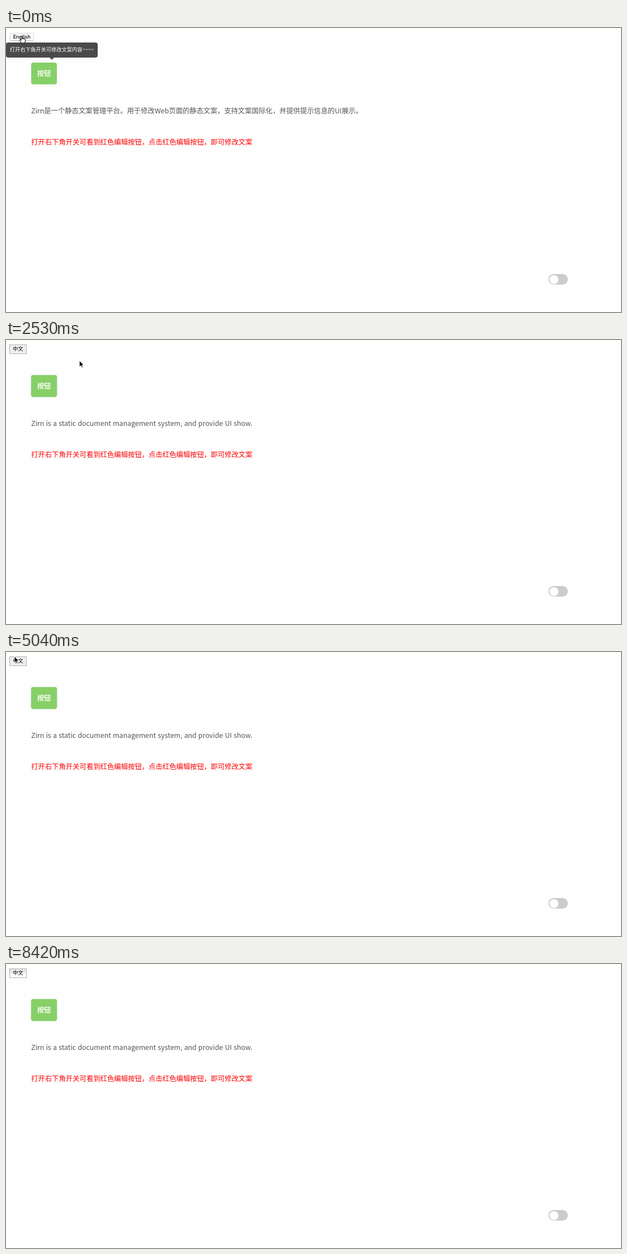
An HTML page that plays this animation: 1100x509 px, repeating every 9010 ms.

```html
<!DOCTYPE html>
<html lang="zh-CN">
<head>
<meta charset="utf-8">
<title>Static text editor</title>
<style>
  html, body { margin: 0; width: 100%; height: 100%; overflow: hidden; background: #fefefe; }
  body { position: relative; font: 12.36px/20px "Noto Sans CJK SC", "Noto Sans CJK", sans-serif; color: #555; }
  div, svg { position: absolute; white-space: nowrap; }
  .zh, .en { left: 0; top: 0; }
  .en { display: none; }
  .english .zh { display: none; }
  .english .en { display: block; }

  #page { left: 0; top: 0; }
  .english #page { top: 1px; }
  .note { left: 45px; top: 138px; }
  .note .en { word-spacing: .5px; }
  .hint { left: 45px; top: 194px; color: #f00; }
  .action {
    left: 45px; top: 62px; width: 46px; height: 39px; border-radius: 4px;
    background: #87d068; color: #fff; -webkit-text-stroke: .3px #fff;
    line-height: 39px; text-align: center;
  }
  .english .action { box-shadow: 0 0 3px rgba(0, 0, 0, .25); }
  .english.fresh .action { box-shadow: 0 0 2px rgba(80, 150, 50, .6); }

  .tip {
    left: 0; top: 26px; width: 164px; height: 26.5px; border-radius: 4px; display: none;
    background: #4a4a4a; color: #fff; font-size: 9.27px; line-height: 25.5px; text-align: center;
  }
  .tip .zh, .tip .en { width: 100%; }
  .tip::after {
    content: ""; position: absolute; left: 50%; top: 100%; margin-left: -4.5px;
    border: 4.5px solid transparent; border-top-color: #4a4a4a; border-bottom: 0;
  }
  .hover .tip { display: block; }
  .english .tip { width: 232px; }

  .lang { box-sizing: border-box; color: #000; text-align: center; }
  .lang.zh {
    left: 6.5px; top: 9px; width: 43.5px; height: 13.5px; border-radius: 3px;
    border: 1px solid #d4d4d4; border-bottom-color: #bbb; background: #fff;
    font: 500 9px/11.5px Inter, sans-serif;
  }
  .pressed .lang.zh { border-color: #2a6fd6; background: linear-gradient(#559ffa, #0a5fe2); }
  .lang.en {
    left: 6px; top: 8px; width: 31px; height: 16.5px;
    border: 1px solid #b0b0b0; background: #efefef; font-size: 9.27px; line-height: 13.5px;
  }
  .fresh .lang.en { background: linear-gradient(#e6e6e6 45%, #fdfdfd 45%); }

  .switch { left: 970px; top: 441px; width: 35px; height: 19px; border-radius: 10px; background: #ccc; }
  .switch::after {
    content: ""; position: absolute; left: 2px; top: 1.5px; width: 16px; height: 16px;
    border-radius: 50%; background: #fff;
  }
  #cursor { left: 0; top: 0; overflow: visible; }
  #cursor path { stroke-linejoin: round; }
  #hand, .pointing #arrow { display: none; }
  .pointing #hand { display: inline; }
  .away #cursor { display: none; }
</style>
</head>
<body>
  <div id="page">
    <div class="action">按钮</div>
    <div class="note">
      <div class="zh">Zirn是一个静态文案管理平台。用于修改Web页面的静态文案，支持文案国际化，并提供提示信息的UI展示。</div>
      <div class="en">Zirn is a static document management system, and provide UI show.</div>
    </div>
    <div class="hint">打开右下角开关可看到红色编辑按钮，点击红色编辑按钮，即可修改文案</div>
    <div class="tip">
      <div class="zh">打开右下角开关可修改文案内容~~~~</div>
      <div class="en">Open the switch, you can edit the document~~~~</div>
    </div>
  </div>
  <div class="lang zh">English</div>
  <div class="lang en">中文</div>
  <div class="switch"></div>
  <svg id="cursor" width="12" height="14">
    <path id="arrow" fill="#000" stroke="#fff" stroke-width=".8"
      d="M0 0V11L2.6 8.7 4.3 12.6 6.1 11.8 4.4 8H7.8Z"/>
    <path id="hand" fill="#fff" stroke="#000"
      d="M3.5 8.5V1.6a1 1 0 0 1 2 0V5.6a.9 .9 0 0 1 1.9 .2a.9 .9 0 0 1 1.8 .4a.9 .9 0 0 1 1.7 .6V9.5L9.6 13H4.3L1 8.7a.9 .9 0 0 1 1.4-1.2Z"/>
  </svg>
<script>
  const LOOP = 9010, TICK = 147.2, START = 610;
  const body = document.body.classList;
  const cursor = document.getElementById("cursor");

  // Turning points of the pointer: tick, x, y
  const path = [
    [-5, 23.5, 14], [0, 21, 16], [2, 21, 16],
    [6, 80, 136], [8, 38.5, 46], [10, 32, 38],
    [12, 150, 1], [15, 94, 109], [18, 91, 114],
    [24, 20, 13], [29, 1, 0], [30, 15, 8], [31, 18, 14],
    [41, 17, 13], [52, 1001, 489]
  ];

  function pointerAt(tick) {
    const i = path.findIndex(p => p[0] > tick);
    if (i < 0) return path[path.length - 1].slice(1);
    const [t0, x0, y0] = path[i - 1], [t1, x1, y1] = path[i];
    const k = (tick - t0) / (t1 - t0);
    return [x0 + (x1 - x0) * k, y0 + (y1 - y0) * k];
  }

  const inside = ([x, y], l, t, r, b) => x >= l && x <= r && y >= t && y <= b;

  function draw(t) {
    const pos = pointerAt(Math.floor((t - START) / TICK));
    const overAction = inside(pos, 45, 62, 91, 102);
    const overLang = inside(pos, 6, 9, 37, 24);
    const backToEnglish = t >= 6510;

    body.toggle("english", t >= 620 && t < 5480 || backToEnglish);
    body.toggle("fresh", t < 1070 || backToEnglish);
    body.toggle("pressed", t >= 330 && t < 620 || t >= 6360 && !backToEnglish);
    body.toggle("hover", t < 150 || overAction);
    body.toggle("pointing", overAction || overLang);
    body.toggle("away", t >= 8420);
    cursor.style.transform = `translate(${pos[0]}px, ${pos[1]}px)`;
  }

  function frame() {
    draw(performance.now() % LOOP);
    requestAnimationFrame(frame);
  }
  frame();
</script>
</body>
</html>
```
